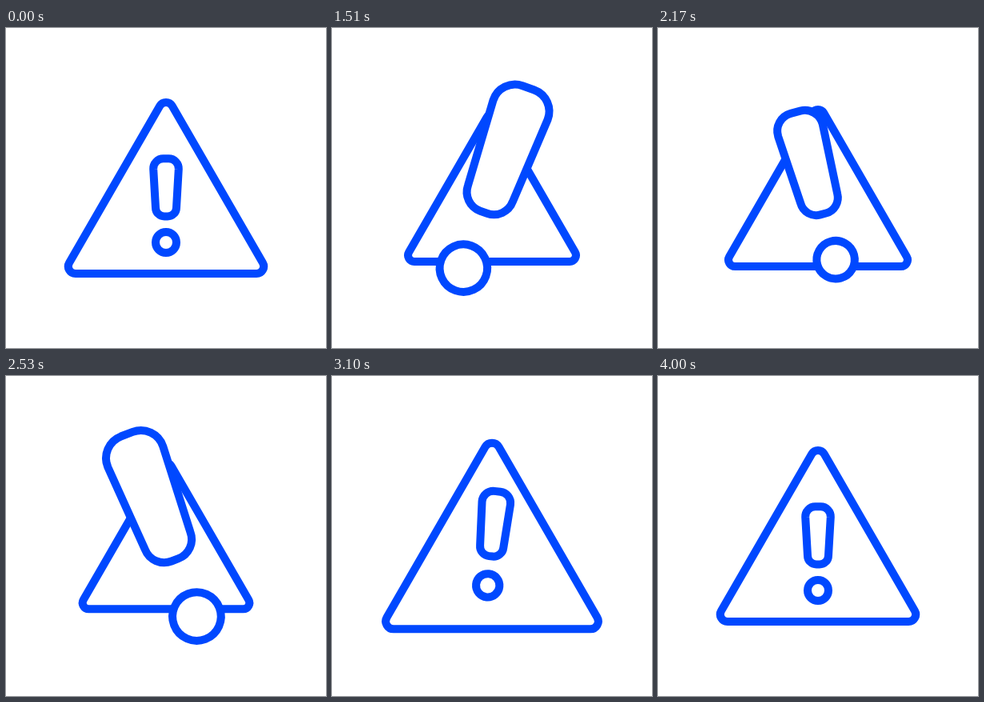
An HTML page for the animation above (4060 ms loop, 400 px wide and 400 px high).

```html
<!DOCTYPE html>
<html lang="en">
<head>
<meta charset="utf-8">
<title>Warning sign</title>
<style>
  html, body { margin: 0; width: 100%; height: 100%; overflow: hidden; background: #fff; }
  svg { display: block; width: 100%; height: 100%; }
  path, circle {
    fill: #fff;
    stroke: #0048ff;
    stroke-width: 10;
    stroke-linejoin: round;
    vector-effect: non-scaling-stroke;
  }
</style>
</head>
<body>
<svg viewBox="0 0 400 400">
  <path id="sign"/>
  <g id="mark">
    <path d="M-3.4-58.7H3.4A12.5 12.5 0 0 1 15.8-45.8L13 2.6A11 11 0 0 1 2 13.5H-2A11 11 0 0 1-13 2.6L-15.8-45.8A12.5 12.5 0 0 1-3.4-58.7Z"/>
    <circle cy="46" r="13"/>
  </g>
</svg>
<script>
  const LOOP = 4060, STEP = 30;
  // Moments in ms: swing out, small in the middle, swing back, pop to full size.
  const START = 1000, RIGHT = 1410, MIDDLE = 1930, LEFT = 2610, POP = 3200;
  const sign = document.getElementById('sign');
  const mark = document.getElementById('mark');

  // Equilateral triangle with rounded corners, drawn around (0, 0).
  function roundedTriangle(top, bottom, r) {
    const half = (bottom - top) / Math.sqrt(3);
    const cut = r * Math.sqrt(3);
    const dx = cut / 2, dy = cut * Math.sqrt(3) / 2;
    const arc = (x, y) => `A${r} ${r} 0 0 1 ${x} ${y}`;
    return `M${-dx} ${top + dy}` + arc(dx, top + dy) +
      `L${half - dx} ${bottom - dy}` + arc(half - cut, bottom) +
      `H${cut - half}` + arc(dx - half, bottom - dy) + 'Z';
  }
  sign.setAttribute('d', roundedTriangle(-116, 107, 9));

  // Eases from 0 to 1 between two moments.
  function ramp(t, from, to) {
    const u = Math.min(1, Math.max(0, (t - from) / (to - from)));
    return u * u * (3 - 2 * u);
  }

  // Falls from 1 to 0 like a critically damped spring.
  function settle(t, from) {
    const u = Math.max(0, t - from) / 78;
    return (1 + u) * Math.exp(-u);
  }

  function place(node, y, tilt, scale) {
    node.setAttribute('transform', `translate(200 ${y}) rotate(${tilt}) scale(${scale})`);
  }

  function draw(t) {
    const out = ramp(t, START, RIGHT);
    const dip = ramp(t, RIGHT, MIDDLE) - ramp(t, MIDDLE, LEFT);
    const release = ramp(t, 2760, POP);
    const pop = release * settle(t, POP);

    const grow = out - .55 * dip - ramp(t, LEFT, 3150);
    const sway = out - 2 * ramp(t, RIGHT, 2400) + ramp(t, 2670, POP);
    const shrink = out - .62 * dip - release;

    place(sign, 200, 0, 1 - .15 * shrink + .123 * pop);
    place(mark, 222 - 22 * grow - 13 * pop, 21 * sway + 9 * pop, 1 + 1.36 * grow + .11 * pop);
  }

  const start = performance.now();
  function tick() {
    const t = (performance.now() - start) % LOOP;
    draw(10 + Math.floor((t - 10) / STEP) * STEP);
    requestAnimationFrame(tick);
  }
  tick();
</script>
</body>
</html>
```
